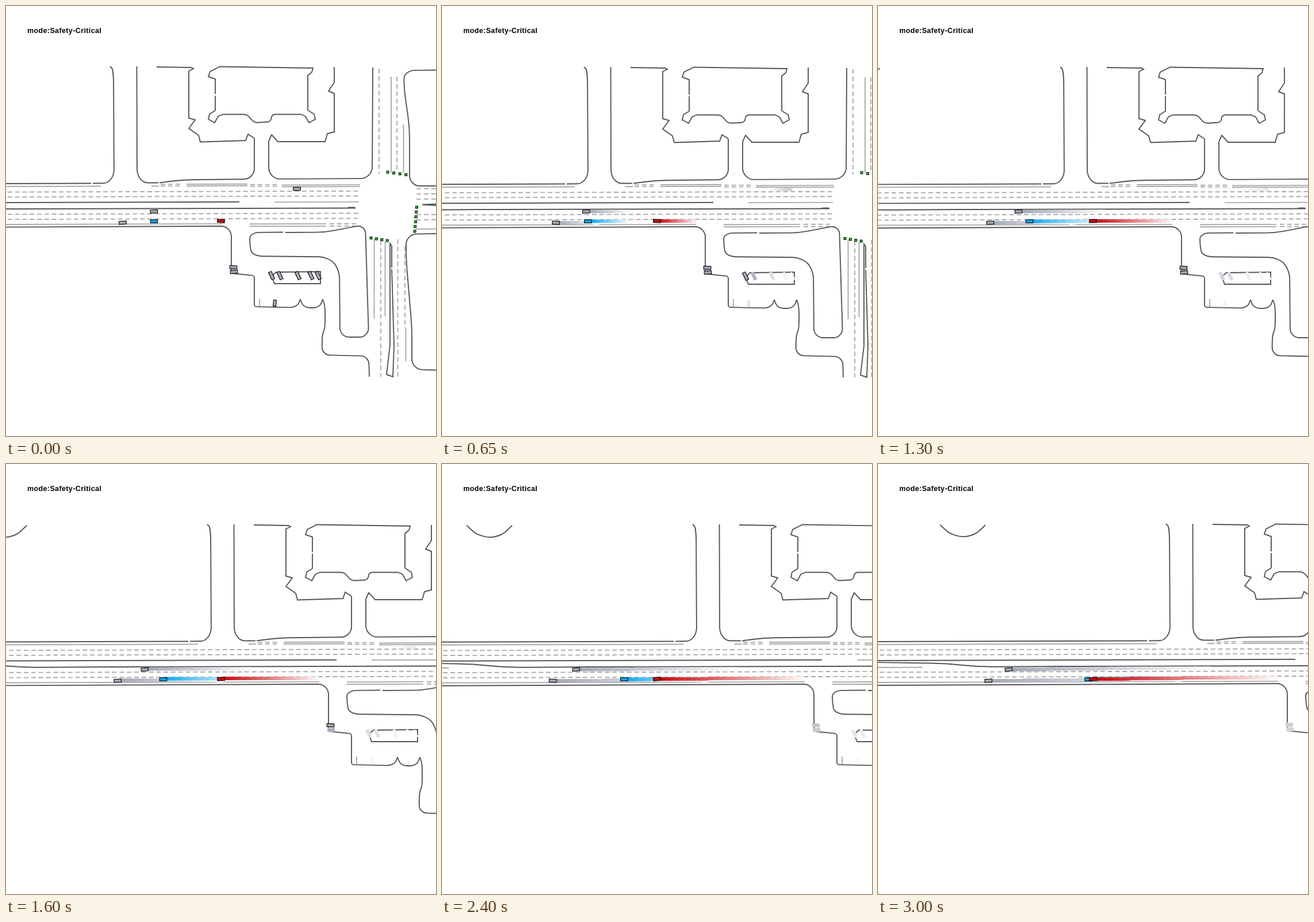
Write an HTML page with a canvas that moves like this. It is 748x748 px and loops after 3550 ms.

```html
<!DOCTYPE html>
<html lang="en">
<head>
<meta charset="utf-8">
<title>Driving scene</title>
<style>
  html, body { margin: 0; width: 100%; height: 100%; overflow: hidden; background: #fff; }
  canvas { display: block; }
  p { position: absolute; left: 37px; top: 36px; margin: 0; color: #000;
      font: bold 12.5px/15px "Liberation Sans", Arial, sans-serif; letter-spacing: .38px; }
</style>
</head>
<body>
<canvas id="stage" width="748" height="748"></canvas>
<p>mode:Safety-Critical</p>
<script>
const ctx = document.getElementById('stage').getContext('2d');
const STEP = 50, LAST = 60, LOOP = 3550, WEST = -330;
const edges = new Path2D(), lanes = new Path2D(), dashes = new Path2D();

// Kerb through x, y pairs with corners rounded up to radius r
function kerb(r, ...xy) {
  const at = n => [xy[2 * n], xy[2 * n + 1]];
  const mix = (a, b, u) => [a[0] + (b[0] - a[0]) * u, a[1] + (b[1] - a[1]) * u];
  const toward = (a, b) => mix(a, b, Math.min(.5, r / Math.hypot(b[0] - a[0], b[1] - a[1])));
  const end = xy.length / 2 - 1;
  edges.moveTo(...at(0));
  for (let n = 1; n < end; n++) {
    const c = at(n), a = toward(c, at(n - 1)), b = toward(c, at(n + 1));
    edges.lineTo(...a);
    edges.bezierCurveTo(...mix(a, c, .55), ...mix(b, c, .55), ...b);
  }
  edges.lineTo(...at(end));
}

// The main road falls slightly to the west; y is its height at x = 0
function along(path, y, from, to) {
  path.moveTo(from, y - .003 * from);
  path.lineTo(to, y - .003 * to);
}
function upright(path, x, from, to) {
  path.moveTo(x, from);
  path.lineTo(x, to);
}

// Blocks north of the road
kerb(24, 181, 105, 187, 111, 188, 308, 151, 308.5);
along(edges, 309, WEST, 148);
kerb(24, 227.5, 105, 228, 307.5, 265, 307.5);
kerb(18, 267, 307.5, 306, 302.5, 432, 301, 432, 230);
kerb(0, 432, 230, 421, 223, 417, 234, 338, 236.5, 335, 225, 318, 213, 329, 198, 318, 195, 318, 113, 326, 109, 322, 107, 262, 106);
kerb(0, 571, 106, 571, 133, 561, 148, 571, 152, 571, 219, 559, 222, 555, 236, 473, 236, 462, 224, 457, 235);
kerb(20, 457, 235, 457, 301, 637, 300, 638, 107);
kerb(18, 748, 111.5, 693, 112, 692, 140, 702, 212, 702, 313, 748, 313);
kerb(20, -212, 107, -190, 127, -155, 128, -133, 107);

// Building with mirrored wings
kerb(0, 364, 153, 364, 127, 352, 123, 355, 114, 372, 105.5, 534, 108, 532, 115, 525, 121, 525, 182);
for (const flip of [x => x, x => 890 - x])
  kerb(0, flip(364), 182, flip(354), 188, flip(352), 197, flip(363), 203, flip(369), 192, flip(377), 188.5);
upright(edges, 364, 156, 182);
kerb(6, 377, 188.5, 419, 188.5, 432, 203, 461, 201.5, 462, 188.5, 514, 188.5);

// Medians
along(edges, 342, WEST, 406);
kerb(30, WEST, 346, -200, 348, -144, 354, 0, 353, 608, 351.5);
along(edges, 352.3, 595, 607);
kerb(0, 748, 344.5, 724, 345.5, 748, 347);
kerb(0, 671, 455, 671, 417, 668, 413, 668, 590, 662, 641, 673, 645, 675, 590, 671, 458);

// Blocks south of the road
kerb(18, WEST, 386, 392, 383, 392, 465);
kerb(4, 392, 465, 432, 469, 432, 523, 498, 524.5, 508, 520, 512, 510);
kerb(10, 512, 510, 518, 525, 545, 525, 551, 510);
kerb(14, 551, 510, 555, 522, 555, 561, 550, 571, 549.5, 607, 631, 609, 632, 645);
kerb(16, 486, 394, 556, 393.5, 625, 380, 631, 576, 581, 576, 580, 457, 560, 436.5, 428, 435, 424, 415, 424, 394, 482, 393.5);
kerb(0, 462, 470, 470, 463, 547, 462, 547, 483, 467, 483, 462, 470);
kerb(18, 748, 396, 696, 397, 696, 440, 706, 560, 706, 632, 748, 633.5);

// Lane markings
for (const y of [323.7, 332.3, 362.3, 371.2]) along(dashes, y, WEST, 617);
for (const n of [0, 1, 2, 5, 6]) along(dashes, 320 + 9 * n, 714, 748);
for (const y of [311, 314]) {
  along(dashes, y, 269, 306);
  along(lanes, y, 314, 420);
  along(dashes, y + 1, 425, 476);
  along(lanes, y + 2, 480, 616);
}
for (const y of [380.5, 384.5]) {
  along(lanes, y, 424, 557);
  along(dashes, y, 563, 614);
}
along(lanes, 314, WEST, 165);
along(lanes, 314, 253, 266);
along(lanes, 342.5, 467, 614);
along(lanes, 354, WEST, -243);
along(lanes, 380, WEST, 376);
along(lanes, 390, 712, 748);
upright(lanes, 441, 509, 522);
upright(dashes, 649, 109, 292);
upright(lanes, 670, 123, 290);
upright(dashes, 680, 123, 290);
upright(lanes, 691.5, 206, 290);
upright(lanes, 640.5, 405, 544);
upright(dashes, 652, 408, 645);
upright(lanes, 659.5, 410, 540);
upright(dashes, 681.5, 406, 645);
upright(dashes, 694, 418, 560);
upright(lanes, 695.5, 560, 618);

// The view follows the red car, which starts gently
const panX = k => Math.round(5.4 * k - 4.2 * (1 - Math.exp(-k / 3)));
const panY = k => Math.round(.95 * Math.cos((k - 16) / 15.2));

const GREY = [162, 168, 182], BLUE = [12, 166, 240], RED = [202, 8, 16];
const until = end => i => i <= end;
const blinking = end => i => i < 17 || (i > 24 && i <= end);

// pose(i) gives the place on the map and the heading at tick i
const parked = (x, y, angle, seen, w = 12.5, h = 5.5) =>
  ({ color: GREY, w, h, seen, pose: () => [x, y, angle] });
const driving = (color, y, screenX, angle) => ({
  color, w: 12.5, h: 5.5, seen: () => true,
  pose: i => [screenX(i) - panX(i), y - panY(i), angle(i)]
});

const cars = [
  ...[462, 476.5, 508, 530.5, 543].map(x => parked(x, 469, 65, until((543 - x) / 6), 14)),
  parked(467.5, 517, 95, until(4), 11, 5),
  parked(395.5, 454.5, 3, blinking(33)),
  parked(396.5, 462.5, -3, blinking(30)),
  { color: GREY, w: 12.5, h: 5.5, seen: until(7), pose: i => [506 + 4.5 * i, 318, 0] },
  driving(GREY, 377, i => 191 + 12 * Math.exp(-i / 25), i => -4 * Math.cos(i / 5)),
  driving(GREY, 357.5, i => 257.3 - .5 * i, () => -4),
  driving(BLUE, 374.5, i => 254 + .0486 * (i - 12) ** 2 - 3.5 * Math.exp(-i / 4), () => 0),
  driving(RED, 374, () => 374, i => 5 * Math.cos(i / 14))
];

// Rows of traffic lights: first place, step, count
const signals = [];
for (const [x, y, dx, dy, count] of [[664, 289, 10.6, 1.5, 4], [635, 403.5, 9.4, 1.5, 4], [714.5, 350, -.7, 8.4, 6]])
  for (let n = 0; n < count; n++) signals.push([x + n * dx, y + n * dy]);

function box(car, i, k) {
  const [x, y, angle] = car.pose(i), fade = k ? i / k : 1;
  ctx.save();
  ctx.translate(x, y);
  ctx.rotate(angle * Math.PI / 180);
  ctx.fillStyle = `rgb(${car.color.map(c => 255 + (c - 255) * fade)})`;
  ctx.fillRect(-car.w / 2, -car.h / 2, car.w, car.h);
  if (i === k) ctx.strokeRect(-car.w / 2, -car.h / 2, car.w, car.h);
  ctx.restore();
}

function strokeMap(path, color, dash = []) {
  ctx.lineWidth = 1.9;
  ctx.strokeStyle = color;
  ctx.setLineDash(dash);
  ctx.stroke(path);
}

function draw(k) {
  ctx.setTransform(1, 0, 0, 1, 0, 0);
  ctx.fillStyle = '#fff';
  ctx.fillRect(0, 0, 748, 748);
  ctx.translate(panX(k), panY(k));
  strokeMap(lanes, '#aaa');
  strokeMap(dashes, '#aaa', [8, 4.8]);
  strokeMap(edges, '#555');
  ctx.setLineDash([]);
  ctx.lineWidth = 1.2;
  ctx.strokeStyle = '#111';
  for (const car of cars)
    for (let i = 0; i <= k; i++) if (car.seen(i)) box(car, i, k);
  ctx.lineWidth = 1;
  ctx.fillStyle = k < 18 ? '#22c022' : '#aaa';
  for (const [x, y] of signals) {
    ctx.fillRect(x - 2, y - 2, 4, 4);
    ctx.strokeRect(x - 2, y - 2, 4, 4);
  }
}

const start = performance.now();
function tick() {
  draw(Math.min(LAST, Math.floor((performance.now() - start) % LOOP / STEP)));
  requestAnimationFrame(tick);
}
tick();
</script>
</body>
</html>
```
